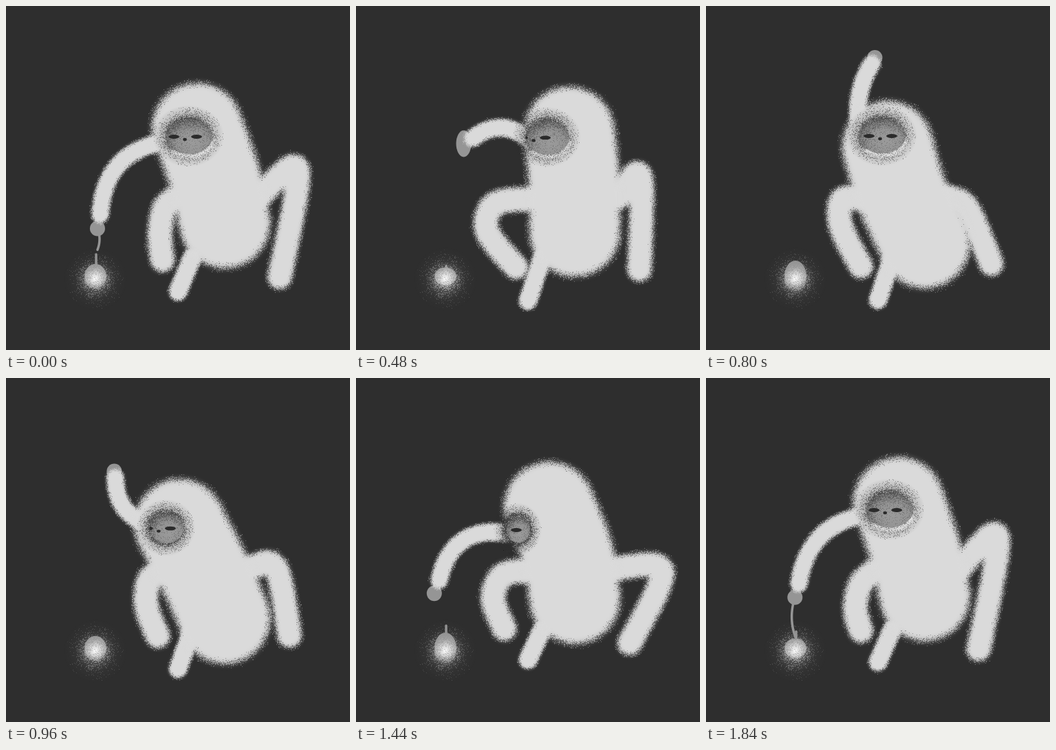
Animation, 500 px wide and 500 px high, one loop 1920 ms. Source, as an HTML page with a canvas:

```html
<!DOCTYPE html>
<html lang="en">
<head>
<meta charset="utf-8">
<title>Yeti and lamp</title>
<style>
html, body { margin: 0; width: 100%; height: 100%; overflow: hidden; background: #2e2e2e; }
canvas { display: block; width: 500px; height: 500px; }
</style>
</head>
<body>
<canvas id="stage" width="500" height="500"></canvas>
<script>
const SIZE = 500, STEP = 80, STEPS = 24;
const BACK = '#2e2e2e', FUR = '#dadada', SKIN = '#959595', DARK = '#2b2b2b';

// Key poses; everything else follows from these few joints.
const POSES = [
  { at: 0, head: [278, 178], face: [266, 190, 34], cuff: [137, 303], bend: [-29], knees: [227, 312, 419, 249] },
  { at: 4, head: [290, 182], face: [267, 201, 34], cuff: [137, 292], bend: [-14], knees: [203, 320, 414, 251] },
  { at: 8, head: [320, 187], face: [285, 181, 30], cuff: [211, 85], bend: [-14], knees: [193, 295, 405, 269] },
  { at: 10, head: [264, 204], face: [256, 189, 34], cuff: [241, 84], bend: [10], knees: [197, 302, 380, 298] },
  { at: 14, head: [254, 215], face: [219, 242, 16], cuff: [83, 212], bend: [12], knees: [213, 320, 408, 264] },
  { at: 18, head: [281, 188], face: [236, 221, 17], cuff: [121, 294], bend: [-28], knees: [206, 304, 438, 286] },
  { at: 23, head: [280, 181], face: [267, 192, 34], cuff: [135, 299], bend: [-26], knees: [221, 317, 419, 243] }];

const ctx = stage.getContext('2d');
const newLayer = () => {
  const c = document.createElement('canvas');
  c.width = c.height = SIZE;
  return c.getContext('2d', { willReadFrequently: true });
};
const shape = newLayer(), layer = newLayer();

let seed = 7;
const noise = Float32Array.from({ length: SIZE * SIZE }, () => {
  seed = (Math.imul(seed, 1664525) + 1013904223) >>> 0;
  return 2 + 252 * seed / 2 ** 32;
});

// One swing per loop, highest at the given step.
const swing = (t, peak) => Math.cos(2 * Math.PI * (t - peak) / STEPS);
const mix = (a, b, u) => a.map((v, k) => v + (b[k] - v) * u);

// Cyclic Hermite interpolation between key poses.
function pose(name, t) {
  const n = POSES.length;
  const key = i => POSES[(i + n) % n];
  const time = i => key(i).at + STEPS * Math.floor(i / n);
  let i = n - 1;
  while (POSES[i].at > t) i--;
  const span = time(i + 1) - time(i), u = (t - time(i)) / span;
  return key(i)[name].map((a, k) => {
    const b = key(i + 1)[name][k];
    const ma = (b - key(i - 1)[name][k]) / (time(i + 1) - time(i - 1)) * span;
    const mb = (key(i + 2)[name][k] - a) / (time(i + 2) - time(i)) * span;
    return a + u * ma + u * u * (3 * (b - a) - 2 * ma - mb) + u * u * u * (2 * (a - b) + ma + mb);
  });
}

// Catmull-Rom samples through the given points.
function spline(points) {
  const out = [], last = points.length - 1;
  for (let i = 0; i < last; i++) {
    const a = points[Math.max(i - 1, 0)], b = points[i];
    const c = points[i + 1], d = points[Math.min(i + 2, last)];
    for (let s = 0; s <= 24; s++) {
      const u = s / 24;
      out.push(b.map((v, k) => v + u / 2 * (c[k] - a[k]
        + u * (2 * a[k] - 5 * v + 4 * c[k] - d[k] + u * (3 * v - a[k] - 3 * c[k] + d[k])))));
    }
  }
  return out;
}

// A quadratic arc from a to b whose middle is pushed sideways.
function bow(a, b, bend) {
  const [dx, dy] = [b[0] - a[0], b[1] - a[1]], d = Math.hypot(dx, dy) || 1;
  return Array.from({ length: 9 }, (_, i) => {
    const u = i / 8, push = 4 * u * (1 - u) * bend / d;
    return [a[0] + dx * u + dy * push, a[1] + dy * u - dx * push];
  });
}

function ellipse(g, x, y, rx, ry, fill) {
  g.beginPath();
  g.ellipse(x, y, Math.max(rx, 0), Math.max(ry, 0), 0, 0, 7);
  if (fill) { g.fillStyle = fill; g.fill(); }
}

// A soft spot: each stop is [distance, color].
function spot(g, x, y, rx, ry, stops) {
  g.translate(x, y);
  g.scale(rx, ry);
  const fill = g.createRadialGradient(0, 0, 0, 0, 0, 1);
  stops.forEach(([at, color]) => fill.addColorStop(at, color));
  ellipse(g, 0, 0, 1, 1, fill);
}

// Adds a blurred tube to the grain layer.
function fuzzy(points, radius, blur) {
  shape.clearRect(0, 0, SIZE, SIZE);
  for (const [x, y] of spline(points)) ellipse(shape, x, y, radius, radius, FUR);
  layer.filter = `blur(${blur}px)`;
  layer.drawImage(shape.canvas, 0, 0);
  layer.filter = 'none';
}

// Breaks soft alpha into fine grain.
function grain(shift, draw) {
  layer.clearRect(0, 0, SIZE, SIZE);
  layer.save();
  draw(layer);
  layer.restore();
  const image = layer.getImageData(0, 0, SIZE, SIZE), d = image.data;
  for (let i = 0; i < noise.length; i++) {
    const a = d[i * 4 + 3];
    if (a) d[i * 4 + 3] = .6 * a + (a > noise[(i + shift) % noise.length] ? 102 : 0);
  }
  layer.putImageData(image, 0, 0);
  ctx.drawImage(layer.canvas, 0, 0);
}

function line(points, width) {
  ctx.beginPath();
  spline(points).forEach(p => ctx.lineTo(...p));
  ctx.lineWidth = width;
  ctx.strokeStyle = SKIN;
  ctx.lineCap = 'round';
  ctx.stroke();
}

function drawLamp(t) {
  const swell = 5 * Math.cos(Math.PI * (t - 10) / 4), top = 375 - swell;
  const wick = t < 7 ? 14 - 2 * t : Math.min(10, 2.5 * (t - 14));
  if (wick > 0) line([[131, top + 4], [131, top - wick]], 3.5);
  const fade = ctx.createLinearGradient(0, 396, 0, 420);
  fade.addColorStop(0, SKIN);
  fade.addColorStop(1, SKIN + '00');
  ellipse(ctx, 130, 393, 16, 18 + swell, fade);
  grain(1234, g => spot(g, 130, 397, 46, 46, [[0, '#fffffff0'], [.2, '#e4e4e4a0'],
    [.4, '#b0b0b058'], [.65, '#8080801c'], [1, '#60606000']]));
}

function drawFace(head, [x, y, rx]) {
  const ry = 12 + .38 * rx;
  const noseX = x + Math.max(-20, 3 + .75 * (x - head[0]));
  const front = Math.min(1, Math.max(0, (rx - 27) / 6));
  grain(54321, g => spot(g, x - 1, y - 1, rx + 18, ry + 20,
    [[0, BACK + 'd8'], [.58, BACK + 'b0'], [.72, BACK + '50'], [1, BACK + '00']]));
  grain(777, g => {
    g.filter = 'blur(2px)';
    g.globalAlpha = .9 * front;
    g.beginPath();
    g.ellipse(x + 1, y + 1, rx, ry + 2, 0, .2, 2.4);
    g.lineWidth = 5;
    g.strokeStyle = '#f0f0f0';
    g.stroke();
  });
  ctx.save();
  ellipse(ctx, x, y, rx, ry, '#9c9c9c');
  ctx.clip();
  grain(9999, g => spot(g, x + rx * .15, y + ry * .35, rx * 1.4, ry * 1.5,
    [[0, '#55555508'], [.5, '#50505030'], [1, '#383838c0']]));
  for (const eyeX of [noseX + 17, noseX - 16]) ellipse(ctx, eyeX, y, 8, 2.9, DARK);
  ellipse(ctx, noseX, y + 4, 2.8, 2.2, DARK);
  ctx.restore();
}

function drawHand(t, elbow, cuff) {
  const dx = cuff[0] - elbow[0], dy = cuff[1] - elbow[1], d = Math.hypot(dx, dy);
  const reach = 10 + 11 * Math.max(0, dy / d);
  const fan = 15 * Math.max(0, -dx / d) ** 4;
  const hand = [cuff[0] + reach * dx / d, cuff[1] + reach * dy / d];
  line([cuff, hand], 12);
  if (t > 20) line(bow(hand, [130, 377], -5), 3.5);
  if (t < 6) line(bow(hand, [hand[0], hand[1] + 31 - 4 * t], 3), 3.5);
  ellipse(ctx, ...hand, 11, 11 + fan, SKIN);
}

function drawLeg(hip, knee, foot, slant) {
  const dx = slant * (foot[0] - hip[0]), dy = slant * (foot[1] - hip[1]);
  const [x, y] = knee;
  fuzzy([hip, [x - dx, y - dy], [x + dx, y + dy], foot], 17.8, 3.2);
}

function drawYeti(t) {
  const head = pose('head', t), face = pose('face', t), cuff = pose('cuff', t);
  const knees = pose('knees', t);
  const bob = swing(t, 7.5);
  const belly = [318, 319 + .85 * (head[1] - 180) + 6 * bob];
  const chest = mix(head, belly, .5);
  chest[0] += Math.min(8, .4 * (face[1] - head[1]));

  const shoulder = [face[0] - face[2] + 2, face[1] + .06 * (cuff[1] - face[1])];
  const sleeve = bow(shoulder, cuff, pose('bend', t)[0]);
  drawHand(t, sleeve[6], cuff);
  grain(0, () => {
    fuzzy(sleeve, 12.5, 2.3);
    drawLeg([chest[0] - 58, 280], knees.slice(0, 2),
      [224 + 9 * swing(t, 4.5), 372 + 8 * bob], .2);
    drawLeg([chest[0] + 64, 278], knees.slice(2),
      [405 + 10 * swing(t, 9), 384 - 10 * swing(t, 11.5)], .13);
    fuzzy([[271, 365], [250, 419 + 10 * bob]], 13.5, 2.3);
    fuzzy([head, chest, belly], 66, 4.5);
  });
  drawFace(head, face);
}

let shown = -1;
function tick() {
  const t = Math.floor(performance.now() / STEP) % STEPS;
  if (t !== shown) {
    shown = t;
    ctx.fillStyle = BACK;
    ctx.fillRect(0, 0, SIZE, SIZE);
    drawLamp(t);
    drawYeti(t);
  }
  requestAnimationFrame(tick);
}
tick();
</script>
</body>
</html>
```
